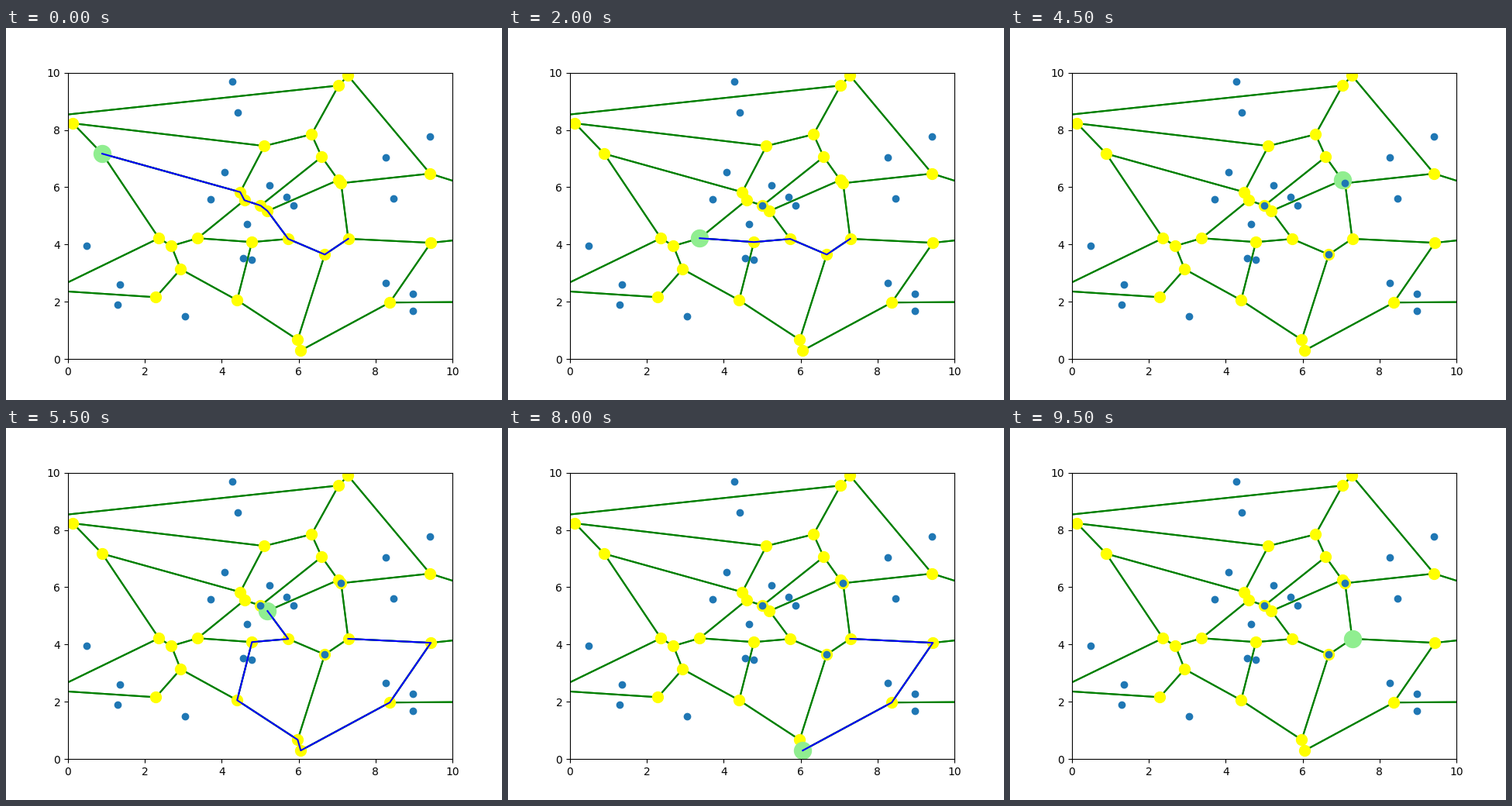
A matplotlib script for the animation above (10 s loop, 640 by 480 pixels).

```python
import matplotlib.pyplot as plt
from matplotlib.animation import FuncAnimation

NODES = {
    "A": (0.13, 8.23), "B": (0.89, 7.17), "C": (4.48, 5.83), "D": (4.59, 5.545),
    "E": (5.01, 5.36), "F": (5.19, 5.17), "G": (5.73, 4.195), "H": (6.68, 3.65),
    "I": (7.29, 4.20), "J": (7.03, 6.25), "K": (7.105, 6.14), "L": (6.60, 7.06),
    "M": (6.335, 7.845), "N": (5.11, 7.44), "O": (7.04, 9.55), "P": (7.285, 9.895),
    "Q": (9.42, 6.475), "R": (9.44, 4.06), "S": (8.37, 1.975), "T": (6.055, 0.30),
    "U": (5.975, 0.675), "V": (4.40, 2.055), "W": (4.785, 4.085), "X": (3.375, 4.22),
    "Y": (2.69, 3.95), "Z": (2.365, 4.22), "a": (2.93, 3.14), "b": (2.285, 2.16),
}
# Where open edges leave the plot
EXITS = {"1": (0, 8.54), "2": (0, 2.68), "3": (0, 2.36),
         "4": (10, 6.23), "5": (10, 4.14), "6": (10, 1.99)}
EDGES = ("AN AB BC BZ ZY Ya YX XD XW ab aV VU VW UT UH TS SR RI IH IK HG GW GF "
         "FE FJ ED EL DC CN NM MO ML LJ JK KQ QP PO O1 Z2 b3 Q4 R5 S6").split()
SITES = [
    (4.265, 9.68), (4.42, 8.6), (9.42, 7.76), (8.27, 7.03), (4.08, 6.52),
    (5.25, 6.06), (3.715, 5.57), (5.69, 5.655), (5.87, 5.355), (8.475, 5.6),
    (4.66, 4.705), (0.49, 3.95), (4.565, 3.52), (4.785, 3.46), (1.355, 2.595),
    (1.295, 1.89), (3.05, 1.485), (8.27, 2.65), (8.98, 2.27), (8.98, 1.675),
]
# Each planned route and the node found blocked along it
PLANS = [("BCDEFGHI", "E"), ("DXWGHI", "H"), ("GFJKI", "K"), ("JFGWVUTSRI", "")]


def build_steps():
    """List (position, remaining route, known obstacles) for every frame."""
    steps, blocked = [], ""
    for route, obstacle in PLANS:
        last = route.index(obstacle) - 1 if obstacle else len(route) - 1
        for i in range(last):
            steps.append((route[i], route[i:], blocked))
        blocked += obstacle
        steps.append((route[last], "", blocked))
    return steps


STEPS = build_steps()
POINTS = {**NODES, **EXITS}


def coords(names):
    return [POINTS[n][0] for n in names], [POINTS[n][1] for n in names]


fig, ax = plt.subplots(figsize=(6.4, 4.8), dpi=100)
ax.set(xlim=(0, 10), ylim=(0, 10))

for edge in EDGES:
    for ends in (edge, edge[::-1]):
        ax.plot(*coords(ends), color="green", zorder=1)
ax.scatter(*zip(*SITES), color="C0", zorder=1.1)
ax.scatter(*coords(NODES), s=100, color="yellow", zorder=1.2)
walker = ax.scatter([], [], s=250, color="lightgreen", zorder=1.3)
obstacles = ax.scatter([], [], color="C0", zorder=1.4)
path, = ax.plot([], [], color="blue", zorder=2)


def update(frame):
    position, route, blocked = STEPS[frame]
    walker.set_offsets([NODES[position]])
    obstacles.set_offsets([NODES[n] for n in blocked] or [(-5, -5)])
    path.set_data(*coords(route))
    return walker, obstacles, path


anim = FuncAnimation(fig, update, frames=len(STEPS), interval=500,
                     repeat=True, repeat_delay=0)
plt.show()
```
